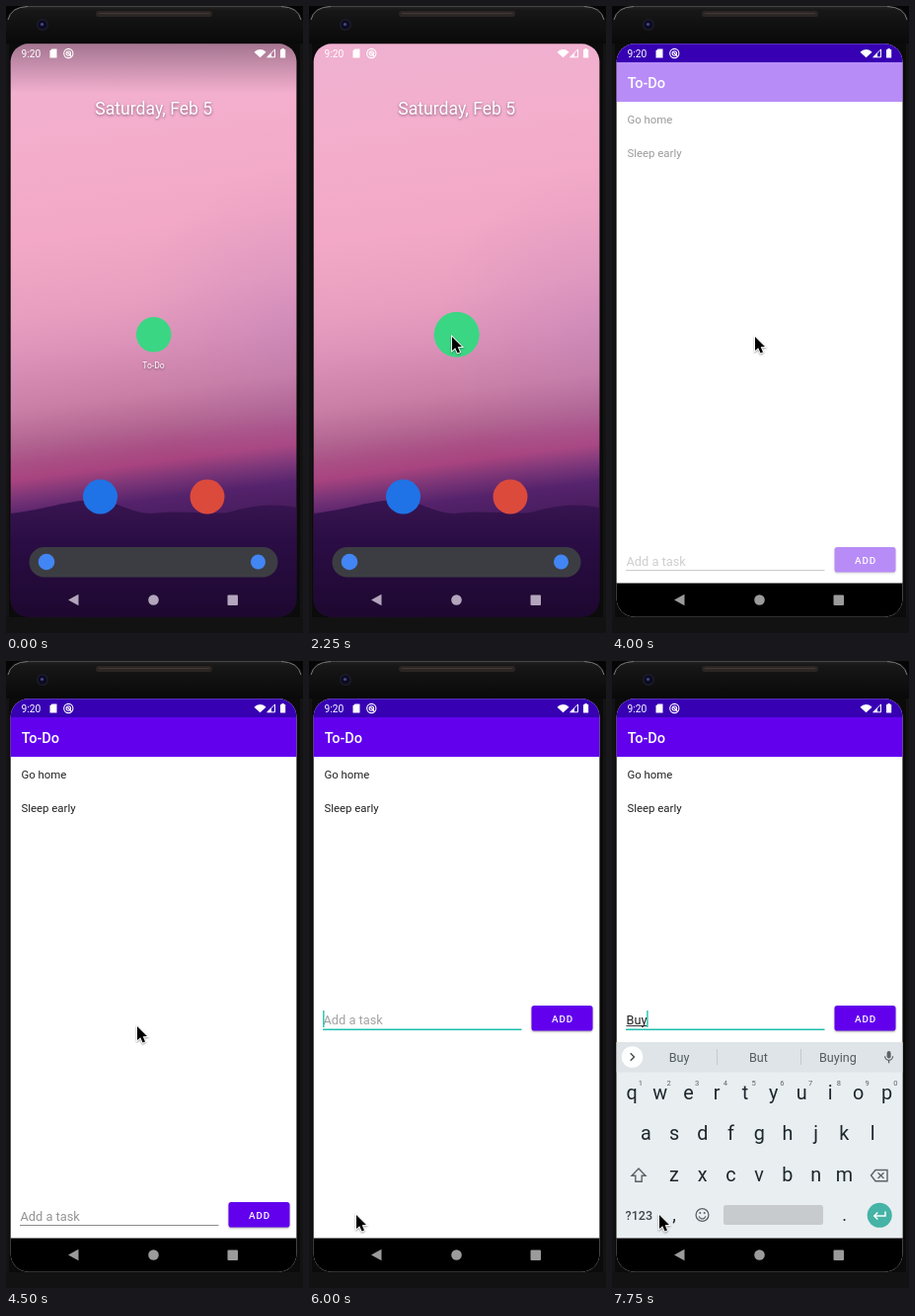
An HTML page with a canvas that plays this animation: 301 px wide and 635 px high, repeating every 8000 ms.

```html
<!DOCTYPE html>
<html lang="en">
<head>
<meta charset="utf-8">
<title>To-Do app</title>
<style>
  html, body { margin: 0; width: 100%; height: 100%; overflow: hidden; background: #0c0c0c; }
  canvas { display: block; width: 301px; height: 635px; }
</style>
</head>
<body>
<canvas id="stage" width="301" height="635"></canvas>
<script>
const ctx = document.getElementById('stage').getContext('2d');
const LOOP = 8000, STEP = 250;
const PURPLE = '#6200ee', TEAL = '#20bfae', KEY = '#1d282d', ICON = '#5b6367';

// Pointer tip: [time, x, y]
const POINTER = [
  [250, 73, 70], [500, 151, 325], [750, 146, 335], [1000, 145, 335],
  [4500, 133, 370], [4750, 67, 605], [5000, 57, 590], [5250, 50, 566], [5500, 48, 561]
];

function rect(x, y, w, h, fill, r = 0) {
  ctx.fillStyle = fill;
  ctx.beginPath();
  ctx.roundRect(x, y, w, h, r);
  ctx.fill();
}

function disc(x, y, r, fill) {
  ctx.fillStyle = fill;
  ctx.beginPath();
  ctx.arc(x, y, r, 0, Math.PI * 2);
  ctx.fill();
}

function ring(x, y, r, color, width = 1.2, from = 0, to = Math.PI * 2) {
  ctx.strokeStyle = color;
  ctx.lineWidth = width;
  ctx.beginPath();
  ctx.arc(x, y, r, from, to);
  ctx.stroke();
}

function trace(points, close) {
  ctx.beginPath();
  for (let i = 0; i < points.length; i += 2) ctx.lineTo(points[i], points[i + 1]);
  if (close) ctx.closePath();
}

function poly(points, fill) {
  trace(points, true);
  ctx.fillStyle = fill;
  ctx.fill();
}

function line(points, color, width = 1.2, close = false) {
  trace(points, close);
  ctx.strokeStyle = color;
  ctx.lineWidth = width;
  ctx.stroke();
}

function text(str, x, y, size, color, { weight = 400, align = 'left', spacing = 0 } = {}) {
  ctx.font = `${weight} ${size}px Roboto, sans-serif`;
  ctx.textAlign = align;
  ctx.letterSpacing = spacing + 'px';
  ctx.fillStyle = color;
  ctx.fillText(str, x, y);
  ctx.letterSpacing = '0px';
}

// Vertical gradient; tilt lets the right side run ahead of the left
function fade(y0, y1, stops, tilt = 0) {
  const len = (y1 - y0) / (1 + tilt * tilt);
  const g = ctx.createLinearGradient(150, y0, 150 + len * tilt, y0 + len);
  for (const [y, color] of stops) g.addColorStop((y - y0) / (y1 - y0), color);
  return g;
}

function body() {
  rect(0, 0, 301, 635, '#0b0b0b');
  rect(0, 0, 301, 38, fade(0, 38, [[0, '#242424'], [4, '#181818'], [16, '#121212'], [38, '#090909']]));
  rect(0, 38, 3, 597, '#131313');
  rect(298, 38, 3, 597, '#131313');
  rect(0, 619, 301, 16, '#121212');
  poly([0, 0, 20, 0, 8, 3, 2, 10, 0, 16], '#050505');
  poly([301, 0, 281, 0, 293, 3, 299, 10, 301, 16], '#050505');
  ctx.strokeStyle = '#777';
  ctx.lineWidth = 1;
  ctx.beginPath();
  ctx.moveTo(2, 14);
  ctx.quadraticCurveTo(5, 1, 22, 0.5);
  ctx.moveTo(299, 14);
  ctx.quadraticCurveTo(296, 1, 279, 0.5);
  ctx.stroke();
  line([22, 0.5, 279, 0.5], '#454545', 1);
  rect(91, 5, 118, 6, '#2b2624', 3);
  line([94, 7.5, 206, 7.5], '#423b38', 1);
  disc(37, 19, 6, '#1c1c2c');
  disc(37, 19, 4.5, '#0c0c20');
  disc(36.5, 18.5, 1.6, '#48488c');
}

function statusBar() {
  const white = '#fff';
  text('9:20', 15.5, 52, 10.2, white);
  poly([46.5, 43.5, 51.5, 43.5, 51.5, 52.5, 44.5, 52.5, 44.5, 45.5], white);
  ring(63.3, 48, 4.6, white, 1.1);
  ring(63.3, 48, 2.2, white, 1.1);
  line([62.5, 47, 66.5, 51.3], white, 1.2);
  ctx.fillStyle = white;
  ctx.beginPath();
  ctx.moveTo(257.5, 52.3);
  ctx.arc(257.5, 52.3, 8.2, -Math.PI * 0.76, -Math.PI * 0.24);
  ctx.fill();
  line([272.5, 44, 272.5, 51.8, 264.7, 51.8], white, 1, true);
  poly([269, 47.5, 269, 52, 264.5, 52], white);
  rect(278, 44, 5.2, 8.5, white, 0.6);
  rect(279.4, 43, 2.4, 1.5, white);
}

function navBar(color) {
  poly([63, 601.5, 73.5, 595.8, 73.5, 607.2], color);
  disc(149.5, 601.5, 5.3, color);
  rect(224.5, 596.5, 10.5, 10.5, color, 1);
}

function wallpaper() {
  rect(4, 38, 291, 581, fade(38, 619, [
    [38, '#f0b0d0'], [110, '#f3afcd'], [220, '#f2a8c6'], [290, '#e9a0c0'], [340, '#dc92b8'],
    [390, '#ca80a6'], [425, '#b26591'], [445, '#aa5086'], [462, '#a8447f'],
    [480, '#7c3577'], [500, '#54226b'], [619, '#1f0a33']
  ], 0.13));
  const haze = ctx.createRadialGradient(300, 330, 5, 300, 330, 170);
  haze.addColorStop(0, 'rgba(175,120,190,.25)');
  haze.addColorStop(1, 'rgba(175,120,190,0)');
  rect(4, 160, 291, 340, haze);
  ctx.fillStyle = fade(496, 619, [[496, '#3a1652'], [540, '#2b0d45'], [619, '#1d0830']]);
  ctx.beginPath();
  ctx.moveTo(4, 514);
  ctx.bezierCurveTo(40, 510, 60, 501, 90, 500);
  ctx.bezierCurveTo(115, 502, 125, 513, 147, 514);
  ctx.bezierCurveTo(180, 510, 205, 515, 224, 513);
  ctx.bezierCurveTo(245, 508, 262, 502, 295, 508);
  ctx.lineTo(295, 619);
  ctx.lineTo(4, 619);
  ctx.fill();
}

function home(t) {
  const opening = t >= 2250;
  wallpaper();
  if (!opening) rect(4, 38, 291, 50, fade(38, 88, [[38, 'rgba(40,20,40,.38)'], [88, 'rgba(40,20,40,0)']]));
  statusBar();
  ctx.shadowColor = 'rgba(60,20,60,.6)';
  ctx.shadowBlur = 3;
  ctx.shadowOffsetY = 1;
  text('Saturday, Feb 5', 149.7, 110, 17.6, '#fff', { align: 'center' });
  if (!opening) text('To-Do', 149.5, 366.5, 8.6, '#fff', { align: 'center' });
  ctx.shadowColor = 'transparent';
  ctx.shadowBlur = ctx.shadowOffsetY = 0;
  const r = opening ? 23 : t >= 1500 ? 20 : t >= 1250 ? 19.5 : 17.8;
  disc(149.7, 332.8, r, '#3bd683');
  disc(95.5, 497, 17.5, '#1f73e6');
  disc(204, 497, 17.5, '#dc4a3c');
  rect(23.5, 548, 252, 30.5, '#3c3d42', 15.2);
  disc(41, 563, 8.3, '#4285f4');
  disc(255.5, 563, 7.5, '#4285f4');
  navBar('#b3a5bb');
}

function inputRow(t) {
  const dy = t >= 6000 ? -199 : 0;
  const focused = t >= 5500;
  const typed = t < 7250 ? '' : 'Buy'.slice(0, 1 + Math.floor((t - 7250) / STEP));
  ctx.save();
  ctx.translate(0, dy);
  let caretX = 14.8;
  if (typed) {
    text(typed, 14.5, 566.5, 12.7, '#202020');
    const w = ctx.measureText(typed).width;
    line([14.5, 568.5, 14.5 + w, 568.5], '#333', 1);
    caretX = 15 + w;
  } else {
    text('Add a task', 14.5, 566.5, 12.8, t >= 5750 ? '#a2a2a2' : '#949494');
  }
  const caret = focused && !(t >= 6250 && t < 6750);
  if (caret) rect(caretX - 0.7, 553, 1.4, 17, TEAL);
  if (focused) rect(14, 571.4, 201.5, 1.6, TEAL);
  else rect(14, 571, 201.5, 1, '#8c8c8c');
  ctx.shadowColor = 'rgba(0,0,0,.35)';
  ctx.shadowBlur = 2;
  ctx.shadowOffsetY = 1;
  rect(225.5, 548, 62, 25.5, PURPLE, 2.8);
  ctx.shadowColor = 'transparent';
  ctx.shadowBlur = ctx.shadowOffsetY = 0;
  text('ADD', 257, 564.5, 9.9, '#fff', { weight: 500, align: 'center', spacing: 0.9 });
  ctx.restore();
}

function toolbar() {
  line([22.3, 397.3, 18.5, 401, 22.3, 404.7], '#454d51', 1.4);
  ring(58.5, 399.5, 3.7, ICON, 1.4);
  line([61, 402, 65.5, 406.5], ICON, 1.6);
  line([97, 396, 107.5, 396, 107.5, 402.5, 103.5, 406.5, 97, 406.5], ICON, 1.3, true);
  ring(102, 400.5, 2.8, ICON, 1.1, 0.2, Math.PI - 0.2);
  disc(100, 399, 0.8, ICON);
  disc(104.3, 399, 0.8, ICON);
  text('GIF', 144.3, 405, 10.5, ICON, { weight: 700, align: 'center' });
  rect(181.5, 395.5, 8, 9, ICON, 1);
  text('G', 185.5, 402.5, 7, '#dee4e7', { weight: 700, align: 'center' });
  line([190, 398.5, 193, 398.5, 193, 407, 186.5, 407, 186, 405], ICON, 1.1);
  line([187.5, 400.5, 192, 400.5, 188.5, 405.5], ICON, 0.9);
  line([213, 393, 213, 409], '#c3c9cc', 1);
  for (const x of [234.8, 239.2, 243.6]) disc(x, 401, 1.4, ICON);
}

function suggestions(t) {
  const words = t < 7500 ? ['B', 'But', 'Be'] : t < 7750 ? ['Bu', 'But', 'Buy'] : ['Buy', 'But', 'Buying'];
  line([18.7, 397.3, 22.5, 401, 18.7, 404.7], '#454d51', 1.4);
  words.forEach((word, i) => text(word, 68 + i * 80.4, 406, 12.6, '#545c60', { align: 'center' }));
  for (const x of [106.5, 191.5]) line([x, 393, x, 409], '#c3c9cc', 1);
}

function keyRow(letters, x, y) {
  [...letters].forEach((c, i) => text(c, x + i * 28.72, y, 19.8, KEY, { align: 'center' }));
}

function keyboard(t) {
  rect(4, 386, 291, 198, '#e9eef1');
  rect(4, 386, 291, 30.5, '#dee4e7');
  disc(20.5, 401, 10.8, '#fff');
  if (t < 7250) toolbar(); else suggestions(t);
  rect(278.6, 395, 4, 7.5, ICON, 2);
  ring(280.6, 400.3, 4, ICON, 1.2, 0, Math.PI);
  line([280.6, 404, 280.6, 407.3], ICON, 1.3);

  keyRow('qwertyuiop', 20, 443.5);
  [...'1234567890'].forEach((n, i) => text(n, 28.8 + i * 28.72, 429.5, 7.6, ICON, { align: 'center' }));
  keyRow('asdfghjkl', 34.3, 485);
  keyRow('zxcvbnm', 63, 526.5);

  line([27, 514, 34, 521.3, 30.2, 521.3, 30.2, 527.3, 23.8, 527.3, 23.8, 521.3, 20, 521.3], ICON, 1.4, true);
  line([262.5, 521, 267, 515.5, 279, 515.5, 279, 526.8, 267, 526.8], ICON, 1.4, true);
  line([269.5, 518.3, 275.5, 524], ICON, 1.3);
  line([275.5, 518.3, 269.5, 524], ICON, 1.3);

  text('?123', 27.3, 565.8, 12.6, '#3e474b', { align: 'center', weight: 500 });
  text(',', 63, 567, 18, KEY, { align: 'center' });
  ring(91.5, 561, 6.4, ICON, 1.3);
  ring(91.5, 561.5, 3.4, ICON, 1.2, 0.25, Math.PI - 0.25);
  disc(89.3, 559, 1, ICON);
  disc(93.7, 559, 1, ICON);
  rect(113, 551, 101, 20, '#c7cbce', 2.5);
  text('.', 235.5, 567, 18, KEY, { align: 'center' });
  disc(271.2, 561.3, 12.5, '#45b3a6');
  line([277, 557.5, 277, 562, 266, 562], '#fff', 1.5);
  line([269.3, 558.5, 265.8, 562, 269.3, 565.5], '#fff', 1.5);
}

function app(t) {
  rect(4, 38, 291, 581, '#fff');
  rect(4, 38, 291, 19, '#3700b3');
  statusBar();
  if (t >= 4000) {
    rect(4, 57, 291, 40, PURPLE);
    text('To-Do', 15.8, 83, 14.6, '#fff', { weight: 500 });
    text('Go home', 15.5, 118.7, 11.4, '#212121');
    text('Sleep early', 15.5, 152.7, 11.4, '#212121');
    inputRow(t);
    // Contents fade in over white
    if (t < 4250) rect(4, 57, 291, 527, 'rgba(255,255,255,.55)');
  }
  rect(4, 584.5, 291, 34.5, '#000');
  if (t >= 6250) {
    ctx.save();
    if (t < 6500) ctx.translate(0, 35);
    keyboard(t);
    ctx.restore();
  }
  navBar('#9b9b9b');
}

function pointer(t) {
  const at = POINTER.filter(p => p[0] <= t).pop();
  if (!at) return;
  ctx.save();
  ctx.translate(at[1], at[2]);
  ctx.shadowColor = 'rgba(0,0,0,.4)';
  ctx.shadowBlur = 2;
  ctx.shadowOffsetY = 1;
  const arrow = [0, 0, 0, 14, 3.2, 11.2, 5.6, 16.5, 8, 15.4, 5.7, 10.3, 10, 10.1];
  line(arrow, '#fff', 1.8, true);
  ctx.shadowColor = 'transparent';
  poly(arrow, '#000');
  ctx.restore();
}

function draw(t) {
  body();
  ctx.save();
  ctx.beginPath();
  ctx.roundRect(4.7, 38.3, 289.7, 580.4, 18);
  ctx.clip();
  if (t < 2500) home(t); else app(t);
  ctx.restore();
  pointer(t);
}

function tick() {
  const t = performance.now() % LOOP;
  draw(Math.floor(t / STEP) * STEP);
  requestAnimationFrame(tick);
}
tick();
</script>
</body>
</html>
```
